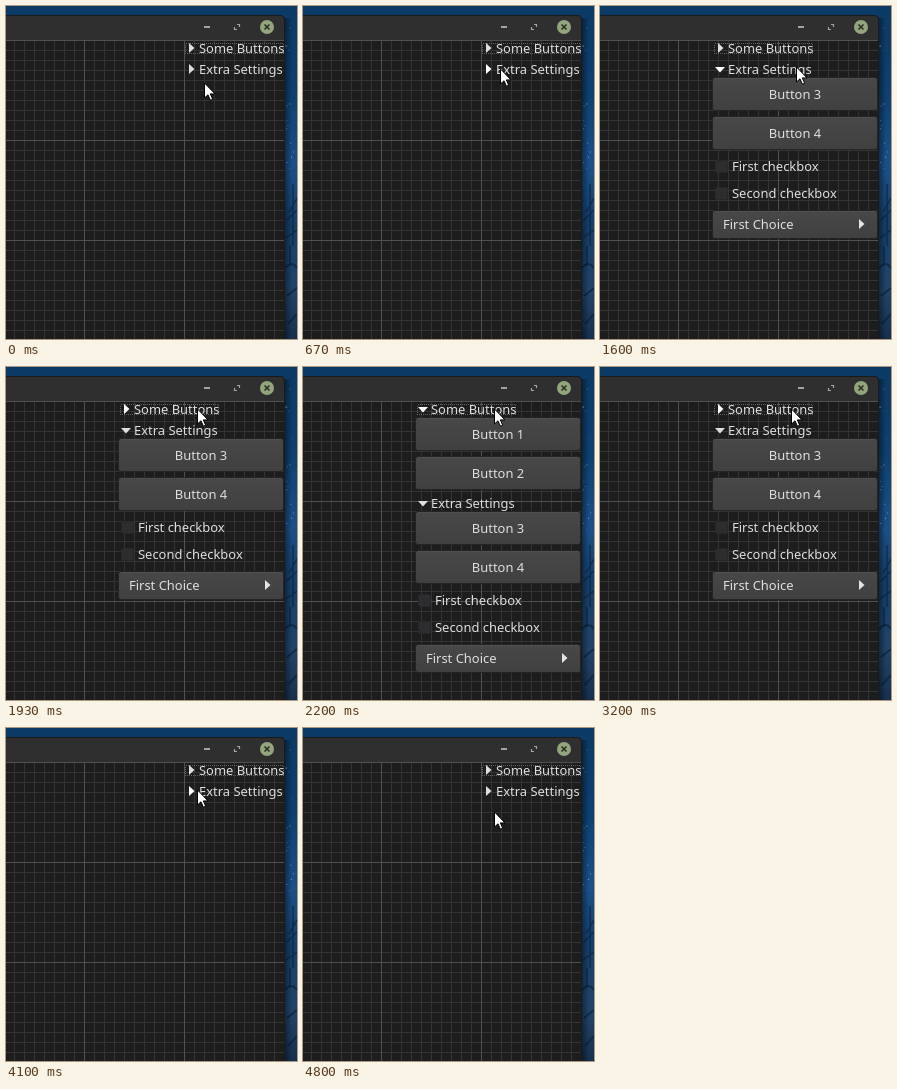
An HTML page for the animation above (5.11 s loop, 291 px wide and 333 px high).

```html
<!DOCTYPE html>
<html lang="en">
<head>
<meta charset="utf-8">
<title>Expander panel</title>
<style>
  html, body { margin: 0; width: 100%; height: 100%; overflow: hidden; background: #0e3560; }
  svg { display: block; width: 291px; height: 333px; }
  text { font: 12.95px "Noto Sans", "Open Sans", sans-serif; fill: #dedede; }
  .crisp { shape-rendering: crispEdges; }
</style>
</head>
<body>
<svg id="stage" viewBox="0 0 291 333">
  <defs>
    <linearGradient id="sky" x1="0" y1="0" x2="0" y2="1">
      <stop offset="0" stop-color="#0c3a66"/>
      <stop offset=".25" stop-color="#0d3f70"/>
      <stop offset=".48" stop-color="#1b5088"/>
      <stop offset=".65" stop-color="#153f6b"/>
      <stop offset=".85" stop-color="#214469"/>
      <stop offset="1" stop-color="#172f4e"/>
    </linearGradient>
    <linearGradient id="shade">
      <stop offset="0" stop-color="#000" stop-opacity=".45"/>
      <stop offset="1" stop-color="#000" stop-opacity="0"/>
    </linearGradient>
    <linearGradient id="face" x1="0" y1="0" x2="0" y2="1">
      <stop offset="0" stop-color="#484848"/>
      <stop offset="1" stop-color="#404040"/>
    </linearGradient>
    <clipPath id="view"><rect y="34" width="278" height="299"/></clipPath>
  </defs>
  <rect width="291" height="333" fill="url(#sky)"/>
  <g id="stars" fill="#9fc3e4"></g>
  <g fill="none" stroke="#0b2442" stroke-opacity=".75">
    <path d="M287 178V240M291 192L283 206M281 214L291 204M280 232L291 224M284 240V260" stroke-width="1.5"/>
    <path d="M279 262Q286 254 291 262M281 290L291 282M282 318L291 308" stroke-width="2"/>
  </g>
  <rect x="278" y="12" width="8" height="321" fill="url(#shade)"/>
  <path d="M0 9H274Q279 9 279 14V333H0Z" fill="#1a1a1a"/>
  <path d="M0 10H274Q278 10 278 14V34H0Z" fill="#2f2f2f"/>
  <g stroke="#a4a49e" fill="none">
    <path d="M198 21H204" stroke-width="2"/>
    <path d="M231 18.5H233.5V21M228.5 21V23.5H231" stroke-width="1.2"/>
  </g>
  <circle cx="261" cy="21" r="7" fill="#93a57c"/>
  <path d="M258.5 18.5L263.5 23.5M263.5 18.5L258.5 23.5" stroke="#292d25" stroke-width="1.5"/>
  <rect y="34" width="278" height="299" fill="#1d1d1d"/>
  <g id="grid" class="crisp"></g>
  <g id="panel" clip-path="url(#view)"></g>
  <path id="pointer" d="M1.5 1V16L5 12.8L7.4 18.2L9.7 17.2L7.3 11.9H12Z"
        fill="#fff" stroke="#000" stroke-linejoin="round"/>
</svg>
<script>
const LOOP = 5110;
const START = { x: 197, y: 76 };
const MOVES = [
  { from: 170, to: 700, steps: 12, x: 196, y: 62 },
  { from: 1530, to: 1930, steps: 11, x: 190, y: 41 },
  { from: 3400, to: 3770, steps: 10, x: 190, y: 61 },
  { from: 4330, to: 4800, steps: 14, x: 190, y: 83 }
];
const byId = id => document.getElementById(id);

function rect(x, y, w, h, attrs) {
  return `<rect x="${x}" y="${y}" width="${w}" height="${h}" ${attrs}/>`;
}
function label(x, y, text, anchor = "start") {
  return `<text x="${x}" y="${y}" text-anchor="${anchor}">${text}</text>`;
}
function slab(y, height) {
  return rect(112.5, y + .5, 165, height, 'rx="2.5" fill="url(#face)" stroke="#242424"') +
    `<path d="M115 ${y + 1.5}H275" stroke="#505050"/>`;
}
function button(y, text) {
  return slab(y, 33) + label(195, y + 22, text, "middle");
}
function checkbox(y, text) {
  return rect(115.5, y + .5, 12, 12, 'rx="1.5" fill="#2d2d30" stroke="#272729"') +
    label(132, y + 11, text);
}
function rightArrow(x, y, color) {
  return `<path d="M${x} ${y - 5}L${x + 5.5} ${y}L${x} ${y + 5}Z" fill="${color}"/>`;
}
function expander(x, y, text, open, hover) {
  const color = hover ? "#fff" : "#dedede";
  const arrow = open
    ? `<path d="M${x + 2} ${y - 2.5}H${x + 12}L${x + 7} ${y + 3}Z" fill="${color}"/>`
    : rightArrow(x + 5, y - .5, color);
  return arrow + label(x + 15, y + 4.5, text);
}

function panel(topOpen, bottomOpen, hover) {
  const x = topOpen || bottomOpen ? 113 : 178;
  const shift = topOpen ? 73 : 0;
  let out = rect(x + 1.5, 37.5, 98, 10,
    'fill="none" stroke="#626262" stroke-dasharray="1 1" class="crisp"');
  out += expander(x, 42.5, "Some Buttons", topOpen, hover === 1);
  if (topOpen) out += button(50, "Button 1") + button(89, "Button 2");
  out += expander(x, 63.5 + shift, "Extra Settings", bottomOpen, hover === 2);
  if (bottomOpen) {
    out += button(71 + shift, "Button 3") + button(110 + shift, "Button 4") +
      checkbox(154 + shift, "First checkbox") + checkbox(181 + shift, "Second checkbox") +
      slab(204 + shift, 28) + label(123, 223 + shift, "First Choice") +
      rightArrow(259, 218 + shift, "#e4e4e4");
  }
  return out;
}

function pointerAt(t) {
  let at = START;
  for (const m of MOVES) {
    if (t < m.from) break;
    const step = Math.floor((t - m.from) / (m.to - m.from) * (m.steps - 1) + 1e-6) + 1;
    const p = Math.min(1, step / m.steps);
    const ease = p * p * (3 - 2 * p);
    at = { x: Math.round(at.x + (m.x - at.x) * ease), y: Math.round(at.y + (m.y - at.y) * ease) };
  }
  return at;
}

function drawGrid() {
  const line = (d, major) => `<path d="${d}" stroke="${major ? "#505050" : "#343434"}"/>`;
  let minor = "", major = "";
  const add = (d, isMajor) => isMajor ? major += line(d, true) : minor += line(d, false);
  for (let x = 8; x < 278; x += 10) add(`M${x + .5} 34V333`, x % 100 === 78);
  for (let y = 34; y < 333; y += 10) add(`M0 ${y + .5}H278`, y % 100 === 34);
  byId("grid").innerHTML = minor + major;
}

function drawStars() {
  let seed = 17, out = "";
  const random = () => (seed = seed * 16807 % 2147483647) / 2147483647;
  for (let i = 0; i < 16; i++) {
    out += `<circle cx="${280 + random() * 10}" cy="${random() * 170}" r="${.4 + random() * .5}" opacity="${.3 + random() * .4}"/>`;
  }
  byId("stars").innerHTML = out;
}

let shown = "";
function render(t) {
  const { x, y } = pointerAt(t);
  const topOpen = t >= 2200 && t < 3200;
  const bottomOpen = t >= 1000 && t < 4100;
  const hover = y < 53 ? 1 : y < 74 && !topOpen ? 2 : 0;
  const state = [topOpen, bottomOpen, hover].join();
  if (state !== shown) {
    byId("panel").innerHTML = panel(topOpen, bottomOpen, hover);
    shown = state;
  }
  byId("pointer").setAttribute("transform", `translate(${x} ${y})`);
}

drawGrid();
drawStars();
render(0);
const begin = performance.now();
function tick() {
  render((performance.now() - begin) % LOOP);
  requestAnimationFrame(tick);
}
requestAnimationFrame(tick);
</script>
</body>
</html>
```
